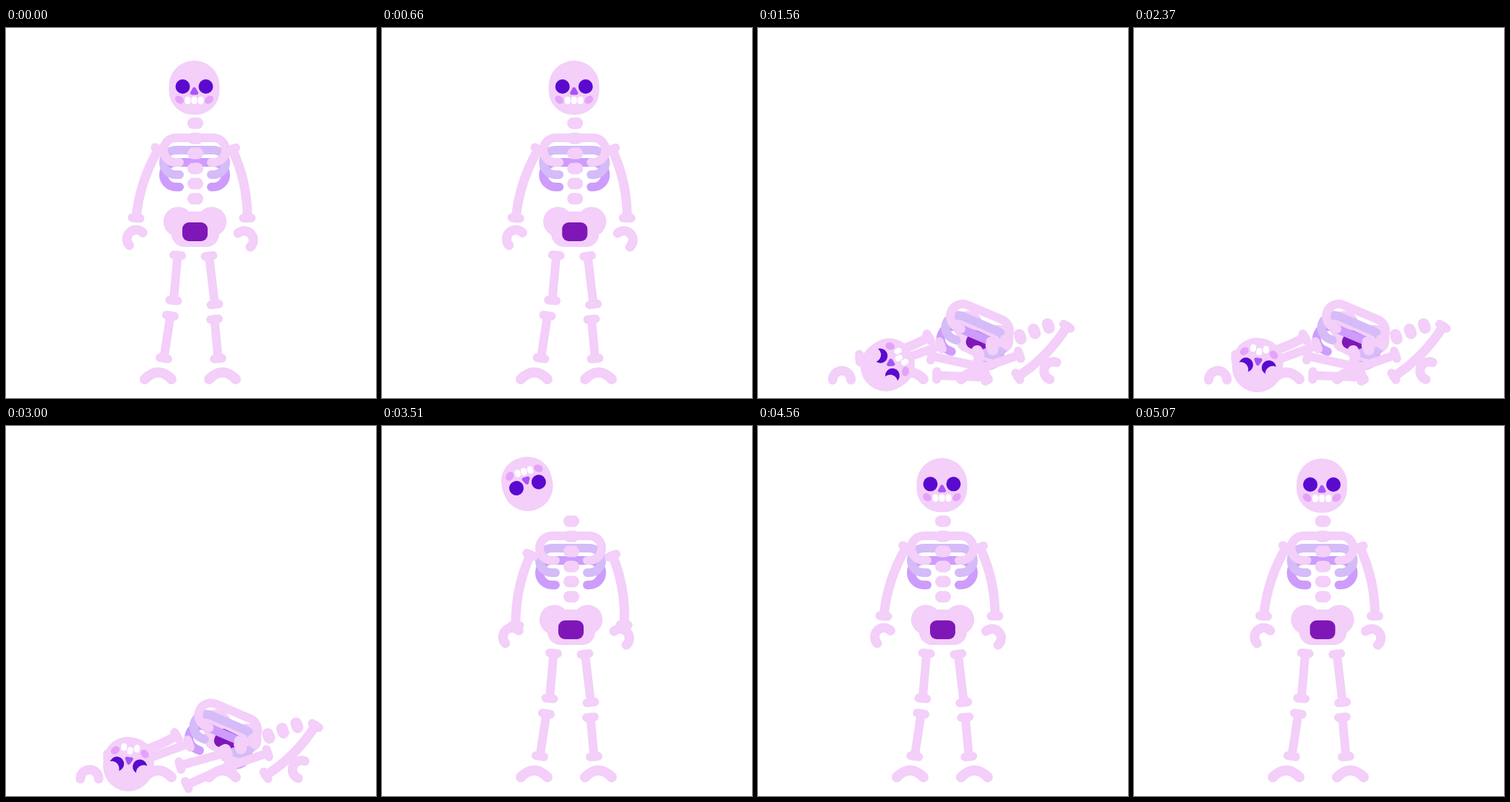
An HTML page with a canvas for the animation above (5100 ms loop, 512 by 512 pixels).

```html
<!DOCTYPE html>
<html lang="en">
<head>
<meta charset="utf-8">
<title>Skeleton</title>
<style>
html, body { margin: 0; width: 100%; height: 100%; overflow: hidden; background: #fff; }
canvas { display: block; width: 100vmin; height: 100vmin; }
</style>
</head>
<body>
<canvas id="stage" width="512" height="512"></canvas>
<script>
const ctx = document.getElementById('stage').getContext('2d');
const LOOP = 5100, FALL = 1000, LAND = 1415, RISE = 3040, UP = 3400;
const PINK = '#f3cff9', LAVENDER = '#d5bbf8', PURPLE = '#cd9cfc', CHEEK = '#e4a2f9',
      EYE = '#5a0acf', NOSE = '#a854f8', HOLE = '#7f17b8';

const ramp = (t, from, to) => Math.min(1, Math.max(0, (t - from) / (to - from)));
const smooth = p => p * p * (3 - 2 * p);

// ---- shapes ----
function stroke(width, color = PINK) {
  ctx.lineWidth = width;
  ctx.strokeStyle = color;
  ctx.stroke();
}

function curve(x1, y1, cx, cy, x2, y2, width) {
  ctx.beginPath();
  ctx.moveTo(x1, y1);
  ctx.quadraticCurveTo(cx, cy, x2, y2);
  stroke(width);
}

function oval(x, y, rx, ry, color, angle = 0) {
  ctx.beginPath();
  ctx.ellipse(x, y, rx, ry, angle, 0, 7);
  ctx.fillStyle = color;
  ctx.fill();
}

function box(x, y, w, h, r, color) {
  ctx.beginPath();
  ctx.roundRect(x, y, w, h, r);
  ctx.fillStyle = color;
  ctx.fill();
}

// Every part is drawn around its own pivot at 0, 0.
function ribs() {
  for (const [drop, color] of [[34, PURPLE], [17, LAVENDER], [0, PINK]]) {
    ctx.beginPath();
    ctx.moveTo(-21, drop + 17);
    ctx.arc(-26, drop, 17, Math.PI / 2, Math.PI * 1.5);
    ctx.arc(26, drop, 17, -Math.PI / 2, Math.PI / 2);
    ctx.lineTo(23, drop + 17);
    stroke(12, color);
  }
}

function spine() {
  for (let i = -2.5; i < 3; i++) curve(-3, i * 20.9, 0, i * 20.9, 3, i * 20.9, 16);
}

function pelvis() {
  for (const x of [-23.2, 23.2]) oval(x, -8, 20.5, 20.5, PINK);
  box(-32.5, -22, 66, 49, 18, PINK);
  box(-17.5, -7, 35, 26, 9, HOLE);
}

const hand = start => () => {
  ctx.beginPath();
  ctx.arc(0, 0, 12.7, start, start + Math.PI);
  stroke(13);
};

const foot = () => curve(-18.5, 0, 0, -19, 18.5, 0, 14);

// mood: 1 is sad, 0 neutral, -1 a grin
function head(mood) {
  box(-35, -37.5, 70, 75, [35, 35, 33, 33], PINK);
  for (const side of [-1, 1]) {
    oval(side * 16, -1.5, 10, 10, EYE);
    if (mood > 0) oval(side * 22.3, -9, 10.5 * mood, 10.5 * mood, PINK);
    oval(side * 20.5, 16.8, 6.5, 5, CHEEK, -side * 0.7);
  }
  ctx.beginPath();
  ctx.moveTo(0, 2);
  ctx.lineTo(3, 7.5);
  ctx.lineTo(-3, 7.5);
  ctx.closePath();
  ctx.fillStyle = NOSE;
  ctx.fill();
  stroke(5, NOSE);
  for (const i of [-1, 0, 1]) box(i * 9 - 4, 12.5 + mood * (i ? 5 : 1), 8, 10.5, 4, '#fff');
}

// ---- parts: standing pivot, and the offset and turn they have in the heap ----
const part = (x, y, paint, heap, extra) => ({ x, y, paint, heap, ...extra });

function bone(x1, y1, x2, y2, heap, extra = {}) {
  const { width = 12, bend = 0 } = extra;
  const dx = (x2 - x1) / 2, dy = (y2 - y1) / 2, half = Math.hypot(dx, dy);
  const cx = -dy / half * bend, cy = dx / half * bend;
  const paint = () => {
    curve(-dx, -dy, cx, cy, dx, dy, width);
    for (const end of [-1, 1]) {
      const x = dx * end, y = dy * end, a = Math.atan2(cy - y, cx - x);
      const kx = -5.5 * Math.sin(a), ky = 5.5 * Math.cos(a);
      curve(x - kx, y - ky, x, y, x + kx, y + ky, 12);
    }
  };
  return part(x1 + dx, y1 + dy, paint, heap, extra);
}

const arm = bend => ({ width: 13, bend, late: 160 });
const still = [0, 0, 0];

const parts = [
  part(261.5, 276, pelvis, [47, 153, 25]),
  part(261, 169, ribs, [46, 240, 23]),
  part(262, 184, spine, [91, 247, 69]),
  bone(211, 168, 180, 263, [-7, 227, -125], arm(11)),
  bone(313, 168, 334, 263, [70, 232, 57], arm(-11)),
  part(180, 292, hand(Math.PI * 0.76), [-64, 195, 43]),
  part(329.5, 293.5, hand(-Math.PI * 0.73), [79, 181, -117], { early: 70 }),
  bone(237.5, 314.5, 232, 377, [36, 115, -83], { roll: -27 }),
  bone(281, 315.5, 289, 382.5, [-4, 133, 99], { roll: -27 }),
  bone(227.5, 398, 218.5, 457, [2, 22, 61]),
  bone(288.5, 403, 293.5, 457.5, [45, 31, 76]),
  part(210.5, 486, foot, still),
  part(299.5, 486, foot, still)
];

// Gravity pulls a part into the heap, then it glides back.
function tumble({ heap: [dx, dy, turn], early = 0, late = 0, roll = 0 }, t) {
  const p = ramp(t, FALL - early, LAND - early);
  const settle = smooth(ramp(t, 2400, 2900));
  const away = (1 - smooth(ramp(t, RISE + late, UP + late))) * (1 + settle * 0.006);
  return [dx * p ** 1.4 * away, dy * p * p * away, (turn * p ** 2.2 + roll * settle) * away];
}

// The head hops off, rolls aside, spins back up, leaps and bounces on the neck.
function headMotion(t) {
  const p = ramp(t, FALL + 40, LAND + 40), roll = ramp(t, FALL, 1800);
  const back = ramp(t, RISE, 3840);
  const lift = 1 - smooth(ramp(t, RISE, UP));
  const since = t - 3850;
  const leap = since < 0
    ? -36 * ramp(t, UP, 3850) ** 2
    : -36 * Math.exp(-since / 190) * Math.cos(Math.PI * since / 320);
  const sink = smooth(ramp(t, 2400, 2900)) * 1.5;
  return {
    dx: (-89.5 * (1 - (1 - roll) ** 2) - sink) * (1 - back * back),
    dy: (384 * p * p - 160 * p * (1 - p) + sink) * lift + leap,
    turn: -173 * roll - 187 * back ** 4,
    mood: smooth(p) * lift - Math.max(0, since > 0 ? leap / 6.5 : 0)
  };
}

function place(x, y, turn, paint) {
  ctx.save();
  ctx.translate(x, y);
  ctx.rotate(turn * Math.PI / 180);
  paint();
  ctx.restore();
}

function draw(t) {
  ctx.fillStyle = '#fff';
  ctx.fillRect(0, 0, 512, 512);
  ctx.lineCap = ctx.lineJoin = 'round';
  // Idle sway around the loop point, fading out towards the feet.
  const phase = t > LOOP / 2 ? t - LOOP : t;
  const sway = Math.abs(phase) < FALL ? 6 * Math.sin(Math.PI * phase / FALL) : 0;
  const lean = y => sway * Math.min(1, (486 - y) / 200);

  for (const item of parts) {
    const [dx, dy, turn] = tumble(item, t);
    place(item.x + dx + lean(item.y), item.y + dy, turn, item.paint);
  }
  const { dx, dy, turn, mood } = headMotion(t);
  place(260.5 + dx + lean(82), 82.5 + dy, turn, () => head(mood));
}

const begin = performance.now();
function tick() {
  draw((performance.now() - begin) % LOOP);
  requestAnimationFrame(tick);
}
tick();
</script>
</body>
</html>
```
